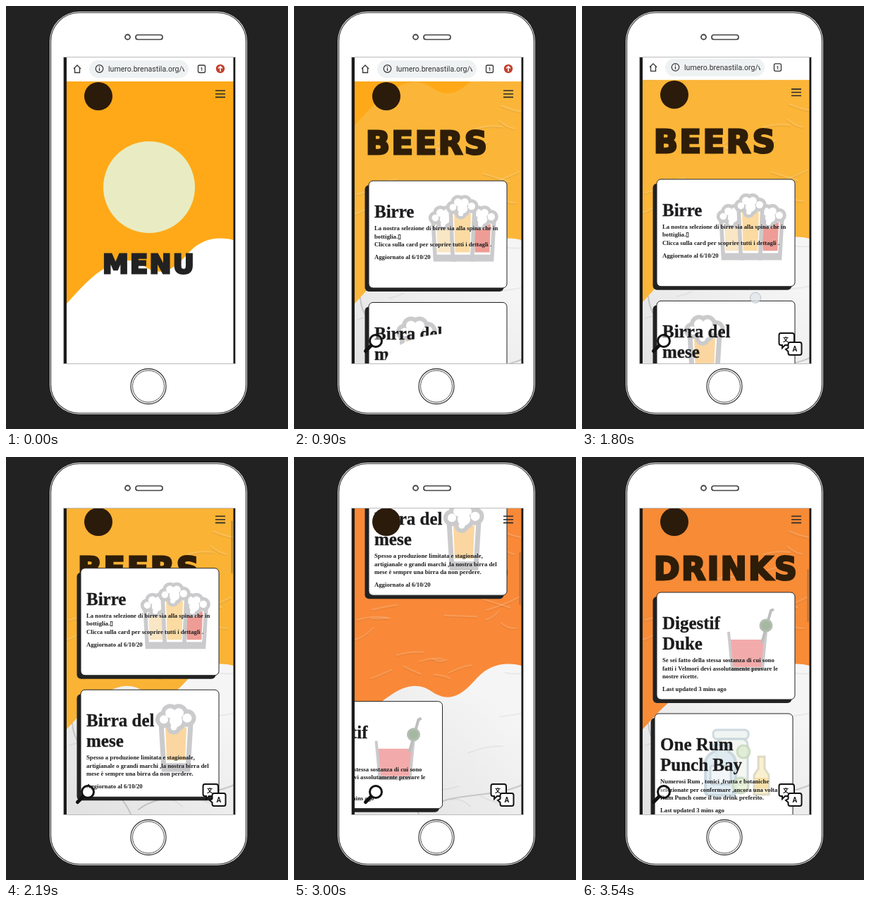
Recreate the animation shown at these times as an HTML page with a canvas. Size 400 by 600 pixels, loop 3.57 s.

```html
<!DOCTYPE html>
<html lang="it">
<head>
<meta charset="utf-8">
<title>Menu</title>
<style>
html, body { margin: 0; width: 400px; height: 600px; overflow: hidden; background: #222; }
canvas { display: block; }
</style>
</head>
<body>
<canvas id="stage" width="400" height="600"></canvas>
<script>
const c = document.getElementById('stage').getContext('2d');
const LOOP = 3570, INK = '#1c1c1e', GREY = '#cbcbcd';
const SERIF = '"Liberation Serif", serif', SANS = 'Roboto, sans-serif', BLACK = '"DejaVu Sans", sans-serif';

const clamp = (v, a = 0, b = 1) => Math.min(b, Math.max(a, v));
const ramp = (t, from, to) => clamp((t - from) / (to - from));
const slideIn = (t, start, dur) => -240 * (1 - ramp(t, start, start + dur)) ** 3;

// Smooth curve through [time, value] points
function spline(points, t) {
  const last = points.length - 1;
  if (t <= points[0][0]) return points[0][1];
  let i = 0;
  while (i < last - 1 && t > points[i + 1][0]) i++;
  const slope = k => {
    const a = points[Math.max(0, k - 1)], b = points[Math.min(last, k + 1)];
    return (b[1] - a[1]) / (b[0] - a[0]);
  };
  const [t0, v0] = points[i], [t1, v1] = points[i + 1];
  const d = t1 - t0, u = clamp((t - t0) / d), w = 1 - u;
  return w * w * ((1 + 2 * u) * v0 + u * d * slope(i)) + u * u * ((3 - 2 * u) * v1 - w * d * slope(i + 1));
}

const SCROLL = [[1650, 0], [1800, -2], [2190, -90], [2610, -215], [3000, -376], [3540, -531]];
const TINTS = [
  [0, 251, 183, 58], [1800, 251, 181, 56], [2190, 250, 179, 53],
  [2610, 247, 143, 44], [3000, 249, 137, 56], [3570, 247, 139, 54]
];

function tint(t) {
  const i = TINTS.findIndex(k => k[0] > t), a = TINTS[i - 1], b = TINTS[i];
  const u = ramp(t, a[0], b[0]);
  return `rgb(${[1, 2, 3].map(k => Math.round(a[k] + (b[k] - a[k]) * u))})`;
}

let seed = 11;
const random = () => (seed = seed * 16807 % 2147483647) / 2147483647;
const creases = Array.from({ length: 36 }, () => ({
  x: 86 + random() * 225, y: 100 + random() * 440,
  dx: 15 + random() * 35, dy: random() * 30 - 18, bend: random() * 16 - 8
}));

function box(x, y, w, h, r, fill, stroke, width = 1) {
  c.beginPath();
  c.roundRect(x, y, w, h, r);
  paint(fill, stroke, width);
}
function disc(x, y, r, fill, stroke, width = 1) {
  c.beginPath();
  c.arc(x, y, r, 0, 7);
  paint(fill, stroke, width);
}
function path(d, fill, stroke, width = 1) {
  const p = new Path2D(d);
  c.lineWidth = width;
  if (fill) { c.fillStyle = fill; c.fill(p); }
  if (stroke) { c.strokeStyle = stroke; c.stroke(p); }
}
function paint(fill, stroke, width) {
  c.lineWidth = width;
  if (fill) { c.fillStyle = fill; c.fill(); }
  if (stroke) { c.strokeStyle = stroke; c.stroke(); }
}
function text(s, x, y, font, fill = INK, bold = 0) {
  c.font = font;
  c.fillStyle = c.strokeStyle = fill;
  c.lineWidth = bold;
  c.fillText(s, x, y);
  if (bold) c.strokeText(s, x, y);
}
function group(x, y, alpha, draw) {
  c.save();
  c.translate(x, y);
  c.globalAlpha *= alpha;
  draw();
  c.restore();
}
function title(s, x, y, size, fill) {
  c.letterSpacing = size * .06 + 'px';
  text(s, x, y, `bold ${size}px ${BLACK}`, fill, 3);
  c.letterSpacing = '0px';
}

// Beer glass with foam; x is its centre and y the top of the foam
function glass(x, y, height, fill, scale = 1) {
  const h = height / scale;
  group(x, y, 1, () => {
    c.scale(scale, scale);
    path(`M-21 27 L-17 ${h - 4} H17 L21 27 Z`, '#fff', GREY, 7);
    path(`M-15 33 L-13 ${h - 17} H13 L15 33 Z`, fill);
    path(`M-17 ${h - 9} H17`, null, GREY, 8);
    const foam = [[-17, 22, 6], [-8, 13, 7], [4, 13, 7], [16, 20, 6.5], [0, 24, 9], [-3, 33, 4.5]];
    foam.forEach(([fx, fy, r]) => disc(fx, fy, r + 6, GREY));
    foam.forEach(([fx, fy, r]) => disc(fx, fy, r, '#fff'));
  });
}

function threeBeers() {
  glass(214, 35, 80, '#f9e6c4', .8);
  glass(267, 35, 80, '#ee9d96', .8);
  glass(239, 20, 95, '#fbdba2', .8);
}
const oneBeer = () => glass(241, 20, 97, '#fbd6a0');

function cocktail() {
  path('M209 67 H260 L256 106 H213 Z', '#f2abaa');
  path('M208 56 L213 109 H256 L261 56', null, GREY, 4);
  path('M213 109 H256', null, '#c4c4c4', 5);
  path('M255 72 L268 26 L272 24', null, '#bdbfbc', 4);
  disc(261, 47, 8, '#a5b8a0', '#b5bdb2', 3);
}

function bottles() {
  const edge = '#c3d2da';
  box(189, 23, 50, 13, 5, '#edf2ef', edge, 3);
  box(194, 36, 44, 65, 8, '#f0f4ee', edge, 3);
  path('M190 44 H211 V54 Q221 60 221 70 V110 Q221 116 215 116 H184 Q178 116 178 110 V70 Q178 60 190 54 Z', '#dbe9f1', edge, 4);
  box(185, 74, 29, 26, 3, '#f6f9fa', edge, 3);
  disc(232, 54, 9, '#dcebcf', '#c5d6bb', 3);
  disc(228, 102, 11, '#e5f0d3', '#c5d6bb', 3);
  path('M253 61 H262 V78 L268 87 V115 H247 V87 L253 78 Z', '#f8edc4', '#d7d3be', 3);
  box(249, 91, 17, 15, 1, '#f4dca0');
}

const CARDS = [
  {
    y: 248, enter: 380, dur: 430, icon: threeBeers, head: ['Birre'], foot: 'Aggiornato al 6/10/20',
    body: ['La nostra selezione di birre sia alla spina che in', 'bottiglia.▯', 'Clicca sulla card per scoprire tutti i dettagli .']
  },
  {
    y: 420.5, enter: 440, dur: 430, icon: oneBeer, head: ['Birra del', 'mese'], foot: 'Aggiornato al 6/10/20',
    body: ['Spesso a produzione limitata e stagionale,', 'artigianale o grandi marchi ,la nostra birra del', 'mese è sempre una birra da non perdere.']
  },
  {
    y: 723, enter: 2781, dur: 800, icon: cocktail, head: ['Digestif', 'Duke'], foot: 'Last updated 3 mins ago',
    body: ['Se sei fatto della stessa sostanza di cui sono', 'fatti i Velmori devi assolutamente provare le', 'nostre ricette.']
  },
  {
    y: 895, enter: 2926, dur: 800, icon: bottles, head: ['One Rum', 'Punch Bay'], foot: 'Last updated 3 mins ago',
    body: ['Numerosi Rum , tonici ,frutta e botaniche', 'selezionate per confermare ,ancora una volta ,il', 'Rum Punch come il tuo drink preferito.']
  }
];

function card(item, t, scroll) {
  const y = item.y + scroll;
  if (t < item.enter || y > 510 || y < -100) return;
  group(slideIn(t, item.enter, item.dur), y, 1, () => {
    box(100.5, 6, 197, 151, 6, '#222');
    box(106, 0, 196, 152, 6, '#fff', '#222');
    const iconShift = item.icon === oneBeer ? -67 * (1 - ramp(t, 1810, 2160)) : 0;
    group(iconShift, 0, item.icon === bottles ? .8 : 1, item.icon);
    item.head.forEach((s, i) => text(s, 114, 52 + 29 * i, `bold 25px ${SERIF}`, INK, .3));
    const top = 70 + 29 * (item.head.length - 1), font = `bold 8.7px ${SERIF}`;
    item.body.forEach((s, i) => text(s, 114, top + 11.5 * i, font));
    text(item.foot, 114, top + 41, font);
    // The lower half of this card shows up late
    if (item.icon === oneBeer && t < 1020) {
      c.beginPath();
      c.rect(107, 1, 194, 150);
      c.clip();
      c.beginPath();
      c.ellipse(225, 88, 96, 44, 0, 0, 7);
      paint('#fff');
    }
  });
}

const WAVE = 'M82 427 C98 409 118 386 134 376 C158 358 178 356 196 369 C224 388 243 368 260 349 C279 329 303 326 326 333 V900 H82 Z';

function paper(t, shift) {
  c.fillStyle = tint(t);
  c.fillRect(82, 73, 243, 434);
  group(0, shift, 1, () => {
    const fill = c.createLinearGradient(86, 540, 240, 350);
    fill.addColorStop(0, '#e1e1e1');
    fill.addColorStop(1, '#f5f5f5');
    path(WAVE, fill);
    c.lineCap = 'round';
    for (const { x, y, dx, dy, bend } of creases) {
      const d = `M${x} ${y} q${dx / 2} ${dy / 2 + bend} ${dx} ${dy}`;
      path(d, null, 'rgba(80,50,20,.06)', 2.5);
      group(.6, -1.8, 1, () => path(d, null, 'rgba(255,255,255,.16)', 2));
    }
    path('M94 414 C96 450 132 470 154 505 S172 530 178 545 M188 536 C220 510 275 522 324 501', null, 'rgba(90,90,90,.25)', 2);
  });
}

// The creased paper rises over the plain backdrop behind the same wave edge
function backdrop(t, shift) {
  c.fillStyle = '#ffa918';
  c.fillRect(82, 73, 243, 434);
  path(WAVE, '#fff');
  const rise = ramp(t, 450, 1110) * 370;
  if (!rise) return;
  c.save();
  c.translate(0, -rise);
  c.clip(new Path2D(WAVE));
  c.translate(0, rise);
  paper(t, shift);
  c.restore();
}

function splash(t) {
  group(0, 0, 1 - ramp(t, 380, 600), () => {
    disc(203, 257, 65, '#e9ecc2');
    title('MENU', 137, 379, 37, '#222');
  });
}

function browserBar(t) {
  c.fillStyle = '#fff';
  c.fillRect(82, 73, 243, 34);
  path('M96 89 L101 84 L106 89 M97.5 88 V94.500 H104.500 V88', null, '#333', 1.3);
  box(118, 77, 141, 25, 12.5, '#eef2f2');
  disc(132.500, 89, 5.3, null, '#333', 1.2);
  path('M132.500 88 V92 M132.500 85.500 V86.700', null, '#333', 1.2);
  c.save();
  c.beginPath();
  c.rect(140, 77, 113, 25);
  c.clip();
  text('lumero.brenastila.org/v', 145, 93, `10.6px ${SANS}`, '#333');
  c.restore();
  box(272.500, 84, 10, 10.5, 2, null, '#333', 1.3);
  text('1', 275.5, 92, `bold 7px ${SANS}`, '#333');
  if (t < 1400) {
    disc(304, 89, 6.2, '#c2402b');
    path('M304 93 V86 M301 88.500 L304 85.500 L307 88.500', null, '#fff', 1.5);
  }
}

function tools(t) {
  group(0, 0, ramp(t, 600, 800), () => {
    c.lineCap = 'round';
    disc(116, 475, 8.5, 'rgba(255,255,255,.4)', '#111', 3);
    path('M109 482 L101.500 489.500', null, '#111', 5);
  });
  group(0, 0, ramp(t, 1100, 1300), () => {
    path('M282 464 H298 Q301 464 301 467 V481 H288 L284 485 V481 H282 Q279.500 481 279.500 478 V467 Q279.500 464 282 464 Z', '#fff', '#111', 2);
    text('文', 285, 476, 'bold 8px "Noto Sans CJK SC", "Noto Sans CJK", sans-serif', '#111');
    path('M295 477 H309 Q311.500 477 311.500 480 V492 Q311.500 495 309 495 H295 Q292.500 495 292.500 492 V490 L289 487 L292.500 485 V480 Q292.500 477 295 477 Z', '#fff', '#111', 2);
    text('A', 298.500, 490, `bold 10px ${SANS}`, '#111');
  });
}

function screen(t) {
  const scroll = spline(SCROLL, t), shift = Math.max(scroll, -36);
  c.save();
  c.beginPath();
  c.rect(82, 73, 243, 434);
  c.clip();
  backdrop(t, shift);
  if (t < 600) splash(t);
  group(0, shift, ramp(t, 400, 620) * (1 - ramp(t, 2450, 2610)), () => title('BEERS', 102, 210, 44.5, '#2e1d08'));
  group(0, shift, ramp(t, 2780, 3160), () => title('DRINKS', 102, 210, 44, '#2e1d08'));
  CARDS.forEach(item => card(item, t, scroll));
  group(0, shift, 1, () => {
    disc(131, 128, 20, '#2b1b0b');
    path('M297 120 H311 M297 124.700 H311 M297 129.400 H311', null, '#2a2a2a', 1.6);
    browserBar(t);
  });
  tools(t);
  if (t > 1700 && t < 2130) disc(246, 416 + scroll, 7.5, 'rgba(225,230,233,.75)', 'rgba(150,165,175,.6)');
  if (t > 1850) box(319.5, 76 - scroll * .157, 2, 75, 1, 'rgba(90,90,90,.45)');
  c.fillStyle = '#1b1b1b';
  c.fillRect(82, 73, 4, 434);
  c.fillRect(322.500, 73, 2.5, 434);
  c.restore();
}

function phone() {
  c.fillStyle = '#222';
  c.fillRect(0, 0, 400, 600);
  box(62, 8, 280, 571, 42, '#fff');
  box(63.5, 9.5, 277, 568, 40.5, null, '#333', 1.2);
  disc(172.500, 44, 3.5, null, '#444', 1.8);
  box(184, 41, 38, 6.5, 3, null, '#444', 1.7);
  disc(202, 539.5, 25, null, '#444', 1.3);
  disc(202, 539.5, 22.5, null, '#555');
  box(81.500, 72.500, 244, 435, 0, null, '#bbb');
}

function frame() {
  const t = performance.now() % LOOP;
  phone();
  screen(t);
  requestAnimationFrame(frame);
}
frame();
</script>
</body>
</html>
```
